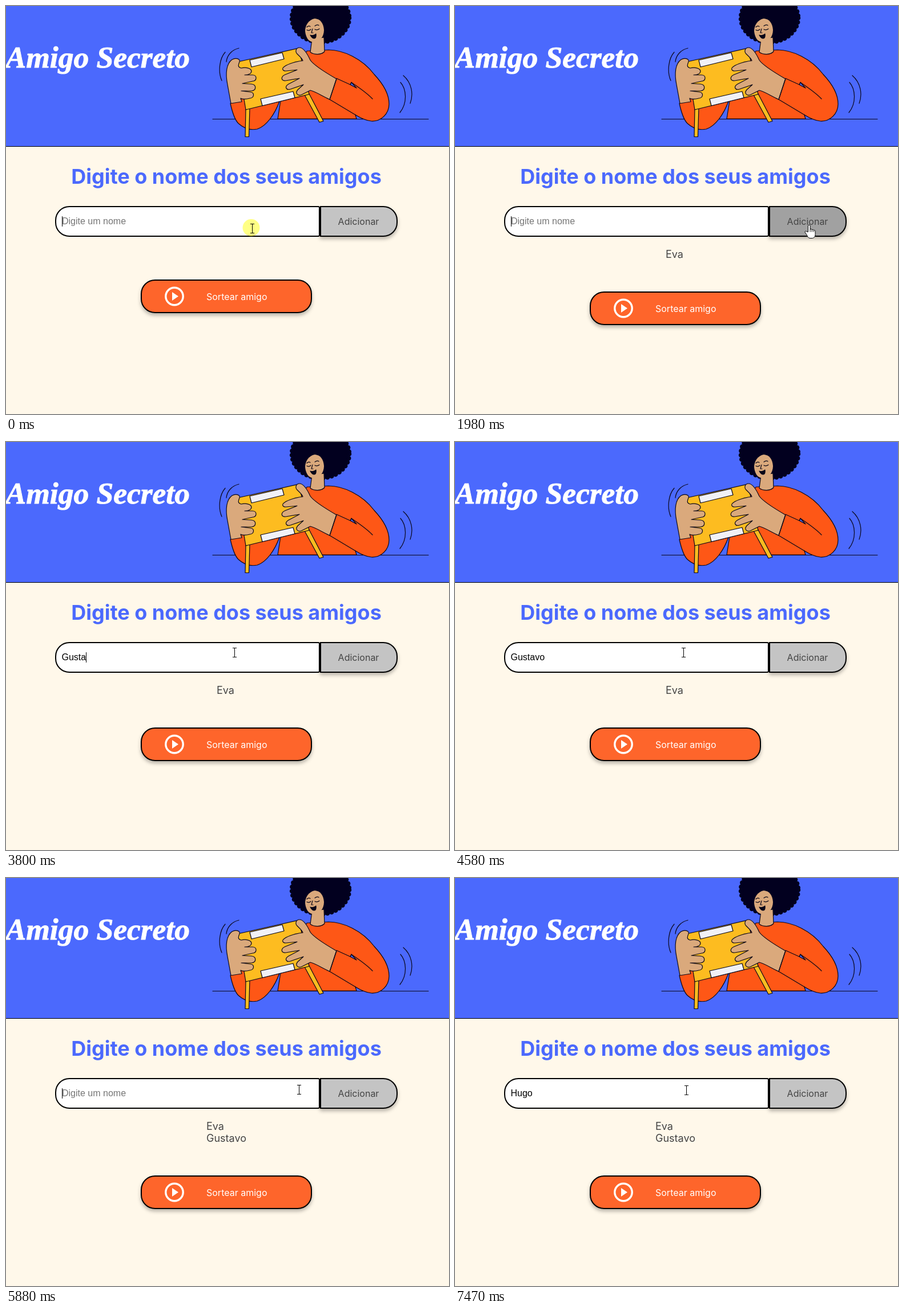
Write an HTML page that moves like this. It is 776 px wide and 716 px high and loops after 8000 ms.

```html
<!DOCTYPE html>
<html lang="pt-BR">
<head>
<meta charset="utf-8">
<title>Amigo Secreto</title>
<style>
  html, body { margin: 0; height: 100%; overflow: hidden; background: #fff8ea; }
  svg { display: block; width: 776px; height: 716px; }
  text { font-family: Inter, sans-serif; font-size: 16px; fill: #444; white-space: pre; }
  .title { font: italic bold 53.5px "Liberation Serif", serif; fill: #fff; stroke: #fff; }
  .heading { font-size: 36px; font-weight: 700; fill: #4b69fd; }
  .field { font-family: "Liberation Sans", sans-serif; fill: #000; }
  .hint { fill: #757575; }
  .name { font-size: 18px; }
  .box { stroke: #000; stroke-width: 2; }
  .shadow { filter: drop-shadow(0 4px 3px rgba(0, 0, 0, .28)); }
  .ink { stroke: #0a0718; stroke-width: 1.2; stroke-linejoin: round; stroke-linecap: round; }
  .line { fill: none; }
  .skin { fill: #daa97c; }
  .cloth { fill: #fe5716; }
  .card { fill: #fdbc20; }
  .label { fill: #f1f1f6; }
  .hair { fill: #02001f; stroke: #02001f; }
</style>
</head>
<body>
<svg viewBox="0 0 776 716">
  <rect width="776" height="246" fill="#4b69fd"/>
  <rect y="246" width="776" height="1"/>
  <text class="title" x="-.5" y="108">Amigo Secreto</text>

  <g class="ink">
    <path class="line" d="M362 198.5H740M384 81C374 92 371 115 378 131M408 74C395 77 387 87 386 98
      M691 134C701 145 704 170 690 187M696 122C711 135 714 155 708 171"/>
    <ellipse class="hair" cx="551" cy="21" rx="50" ry="42"/>
    <ellipse class="hair" cx="551" cy="21" rx="50" ry="42" stroke-width="8.500" stroke-dasharray="0 7.500"/>
    <path class="cloth" d="M393 171C397 189 401 200 407 206C418 216 430 218 440 216C456 211 471 190 479 167L413 160Z"/>
    <path class="cloth" d="M476 198L481 166L520 90L527 79L565 77C590 77 624 92 645 120C660 136 671 153 671 172
      C671 190 656 203 640 202C629 201 620 196 612 191L614 198Z"/>
    <path class="skin" d="M536 58L533 81C540 86 552 86 558 80L557 55Z"/>
    <path class="skin" stroke="none" d="M541 22C530 24 524 34 524 44C525 55 530 63 538 63C550 63 557 54 557 42C556 30 551 23 541 22Z"/>
    <path class="line" d="M527 42q4 2 7-1M541 41q4 2 8-1M527 37q3-3 6-1M541 35q4-3 7-1M537 40L535 47H538"/>
    <path fill="#0a0718" d="M533 51Q539 53 543 49Q544 56 540 57Q536 57 533 51Z"/>

    <path class="card" d="M420 181L427 179L425.500 229.500H419Z"/>
    <path class="card" d="M523 156L531 154L556 202L549 204Z"/>
    <path class="card" d="M406 98L513 74L531 155L420 182Z"/>
    <path class="label" d="M427 95L484 82L487 93L430 107ZM446 163L503 150L506 161L449 175Z"/>
    <path class="skin" d="M394 171L388 138C384 118 386 101 396 94C403 90 411 93 409 98C407 103 405 107 412 109
      C420 107 429 109 430 114C430 119 424 121 418 121L432 121C440 121 440 131 432 132L414 136L430 137
      C439 138 439 148 430 149L412 149L428 151C436 152 435 161 427 162C420 164 415 164 411 162L413 168Z"/>
    <path class="skin" d="M579 128C560 117 540 105 533 95C528 84 521 73 514 73C508 73 506 80 510 84C515 89 519 92 520 96
      C510 97 495 101 488 106C482 110 485 114 490 114L510 112L490 120C480 124 482 132 490 131L514 127L495 137
      C487 142 491 148 498 146L521 138L511 147C506 153 511 158 517 156L533 148C542 150 552 157 567 164Z"/>
    <path fill="#4b69fd" d="M603 138L605 134L614 144Z"/>
    <path class="line" d="M612 191L567 164L579 127L603 138L605 134C618 143 632 152 642 163"/>
  </g>

  <text class="heading" x="386" y="312" text-anchor="middle">Digite o nome dos seus amigos</text>
  <path id="input" class="box" fill="#fff"/>
  <path id="add" class="box shadow" d="M551 352H661A24 24 0 0 1 685 376V380A24 24 0 0 1 661 404H551Z"/>
  <text x="617.500" y="384" text-anchor="middle">Adicionar</text>
  <text id="hint" class="field hint" x="98" y="383">Digite um nome</text>
  <text id="value" class="field" x="97.500" y="383"></text>
  <rect id="caret" y="369" width="1" height="18"/>

  <text id="first" class="name" y="442"></text>
  <text id="second" class="name" x="351" y="463"></text>

  <g id="draw">
    <rect class="box shadow" x="237" y="481" width="298" height="57" rx="24" fill="#fe652b"/>
    <circle cx="295" cy="509.500" r="15.200" fill="none" stroke="#fff" stroke-width="3.400"/>
    <path fill="#fff" d="M291 502L302 509.500L291 517Z"/>
    <text x="351" y="516" style="fill:#fff">Sortear amigo</text>
  </g>

  <circle id="click" r="15" fill="#ff0" opacity=".48"/>
  <g id="cursor" stroke="#000" fill="#fff">
    <path id="arrow" d="M0 0V16L3.800 12.500L6.500 18.500L9 17.500L6.500 11.800H11.500Z"/>
    <path id="beam" fill="none" d="M-3.500-8H3.500M-3.500 8H3.500M0-8V8"/>
    <path id="hand" d="M-2 12V1.500a1.800 1.800 0 0 1 3.600 0V7.500c1-1 3-.6 3.200.8c1-.9 3-.5 3.100.8c1.300-.6 2.700 0 2.700 1.500V16
      c0 4-2 7-6 7h-3c-3 0-4.500-3-6-6l-3-4.500c-.8-1.500 1.500-2.600 2.700-1.200zM1.600 7.500V12M4.800 8.300V12M7.900 9.100V12"/>
  </g>
</svg>
<script>
const LOOP = 8000, STEP = 130;
const $ = id => document.getElementById(id);
const show = (id, on) => $(id).setAttribute('visibility', on ? 'visible' : 'hidden');
const move = (id, x, y) => $(id).setAttribute('transform', `translate(${x} ${y})`);

// Each name: key press times, then when the add button goes down and up.
const entries = [
  { name: 'Eva', keys: [150, 410, 540], down: 1850, up: 1980 },
  { name: 'Gustavo', keys: [3150, 3280, 3410, 3670, 3800, 3930, 4060], down: 5490, up: 5620 },
  { name: 'Hugo', keys: [6400, 6660, 6920, 7050], down: Infinity, up: Infinity }
];
// Pointer stops: time, x, y
const track = [
  [0, 431, 390], [1060, 431, 390], [1330, 632, 407], [1590, 620, 384], [1980, 620, 384],
  [2500, 400, 371], [3020, 400, 371], [3150, 400, 369], [4580, 400, 369],
  [5240, 567, 374], [5490, 571, 371], [5620, 571, 371], [6270, 405, 372], [LOOP, 405, 372]
];

function pointerAt(t) {
  const held = Math.floor((t - 20) / STEP) * STEP + 30;
  const time = Math.min(Math.max(held, 0), t);
  const i = track.findIndex(stop => stop[0] > time);
  const [t0, x0, y0] = track[i - 1], [t1, x1, y1] = track[i];
  const p = (time - t0) / (t1 - t0), ease = p * p * (3 - 2 * p);
  return [Math.round(x0 + (x1 - x0) * ease), Math.round(y0 + (y1 - y0) * ease)];
}

function inputShape(r) {
  const corner = (dx, dy) => `a${r} ${r} 0 0 1 ${dx * r} ${dy * r}`;
  return `M111 352H${549 - r}${corner(1, 1)}V${404 - r}${corner(-1, 1)}H111` +
    'A24 24 0 0 1 87 380V376A24 24 0 0 1 111 352Z';
}

function render(t) {
  const entry = entries.find(e => t < e.up);
  const count = entries.indexOf(entry);
  const typed = entry.keys.filter(k => k <= t);
  const pressed = t >= entry.down;

  $('value').textContent = entry.name.slice(0, typed.length);
  show('hint', !typed.length);

  // The caret restarts its blink at every key press and when the field regains focus.
  const since = t - (typed.at(-1) ?? (count ? entries[count - 1].up : 0));
  show('caret', !pressed && Math.floor(since / 520) % 2 === 0 && t < 7470);
  $('caret').setAttribute('x', typed.length ? Math.round(97.5 + $('value').getComputedTextLength()) : 98);
  $('input').setAttribute('d', inputShape(pressed ? 0 : 2));

  $('first').textContent = count > 0 ? entries[0].name : '';
  $('first').setAttribute('x', count > 1 ? 351 : 369);
  $('second').textContent = count > 1 ? entries[1].name : '';
  move('draw', 0, 21 * count);

  const [x, y] = pointerAt(t);
  const inRow = y > 351 && y < 405;
  const overAdd = inRow && x >= 550, overInput = inRow && x < 550;
  $('add').setAttribute('fill', overAdd ? '#a1a1a1' : '#c4c4c4');
  show('hand', overAdd);
  show('beam', overInput);
  show('arrow', !inRow);
  move('cursor', x + .5, y + .5);
  move('click', x - 1.5, y - 1);
  show('click', pressed || t < 150);
}

function frame() {
  render(performance.now() % LOOP);
  requestAnimationFrame(frame);
}
frame();
</script>
</body>
</html>
```
